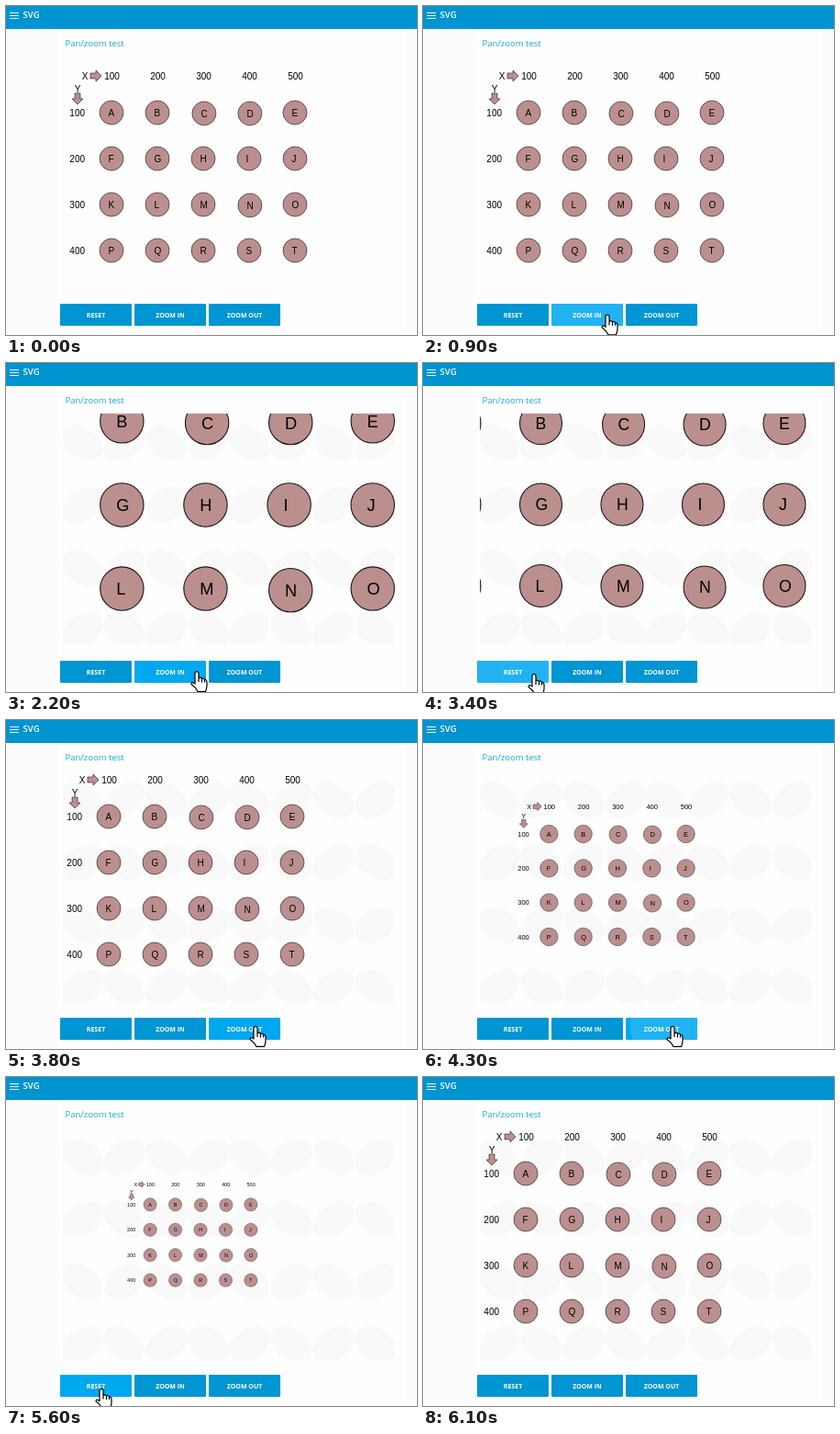
Write an HTML page that moves like this. It is 448 px wide and 358 px high and loops after 7 s.

```html
<!DOCTYPE html>
<html lang="en">
<head>
<meta charset="utf-8">
<title>Pan/zoom test</title>
<style>
  html, body { margin: 0; width: 100%; height: 100%; overflow: hidden; background: #fcfcfc; }
  svg { display: block; }
  text { font-family: "Open Sans", sans-serif; }
  #plot text { font: 10px "Liberation Sans", Arial, sans-serif; }
  .mid { text-anchor: middle; }
  .shape { fill: #bc8f8f; stroke: #1c1414; stroke-width: .6; }
  .caption { font-size: 7px; font-weight: 700; fill: #fff; }
  .cursor { fill: #fff; stroke: #000; stroke-width: 1.2; stroke-linejoin: round; }
</style>
</head>
<body>
<svg width="448" height="358" viewBox="0 0 448 358">
  <defs id="defs">
    <clipPath id="view"><rect x="62" y="55" width="362" height="252"/></clipPath>
  </defs>
  <rect x="57" y="25" width="378" height="333" fill="#fefefe"/>
  <rect width="448" height="25" fill="#0094d1"/>
  <path d="M4 7.5h10M4 10.5h10M4 13.5h10" stroke="#fff" stroke-width=".9"/>
  <text x="18.6" y="13" font-size="9.5" font-weight="600" fill="#fff">SVG</text>
  <text x="64.5" y="44" font-size="9.5" fill="#1ba3dd">Pan/zoom test</text>
  <g clip-path="url(#view)">
    <g id="backdrop" fill="#f9f9f9"></g>
    <g id="plot"></g>
  </g>
  <g id="buttons"></g>
  <path id="hand" class="cursor" d="M-2 2Q0-1 2 2V8Q4 6.5 5.5 8.5Q7.5 7.5 8.5 9.5Q10.5 9 11 12V16Q11 19 9.5 22.5H1Q-1 18-6 14.5Q-6 11-2 14ZM2 8v4M5.5 8.5v4M8.5 9.5v3"/>
  <path id="move" class="cursor" d="M0-11L4-6H1.5V-1.5H6V-4L11 0L6 4V1.5H1.5V6H4L0 11L-4 6H-1.5V1.5H-6V4L-11 0L-6-4V-1.5H-1.5V-6H-4Z"/>
</svg>
<script>
const LOOP = 7000, STEP = 100;
const CENTER = { x: 212, y: 180 }, PAN = { x: 3, y: 11 };
const ZOOM = 1.35, ZOOM_MS = 230, RIPPLE_MS = 500;
const POINTER_IN = 100, POINTER_OUT = 6100;

const $ = id => document.getElementById(id);

function set(node, attrs) {
  for (const key in attrs) node.setAttribute(key, attrs[key]);
  return node;
}

function add(parent, tag, attrs, text = "") {
  const node = set(document.createElementNS("http://www.w3.org/2000/svg", tag), attrs);
  node.textContent = text;
  return parent.appendChild(node);
}

// Faint ornament of tilted leaves, mirrored left to right
for (let row = 0; row < 4; row++)
  for (let col = 0; col < 4; col++)
    for (const side of [1, -1])
      add($("backdrop"), "ellipse", {
        rx: 25, ry: 17,
        transform: `translate(${243 + side * (22 + 46 * col)} ${87 + 68 * row})
          rotate(${side * ((row + col) % 2 ? -35 : 35)})`
      });

const plot = $("plot");
const at = i => 50 * i;
const label = (x, y, text) => add(plot, "text", { x, y: y + 3.6, class: "mid" }, text);
for (let col = 0; col < 5; col++) label(112.5 + at(col), 65, 100 * (col + 1));
for (let row = 0; row < 4; row++) {
  label(74.7, 105 + at(row), 100 * (row + 1));
  for (let col = 0; col < 5; col++) {
    const letter = String.fromCharCode(65 + row * 5 + col);
    const nudge = "CDN".includes(letter) ? .9 : 0;
    const x = 112 + at(col) + nudge, y = 105 + at(row) + nudge;
    add(plot, "circle", { cx: x, cy: y, r: 13, class: "shape" });
    add(plot, "text", { x: x - 3.4, y: y + 3.6 }, letter);
  }
}
label(83, 65, "X");
label(75, 79, "Y");
for (const place of ["translate(89 65)", "translate(75 84) rotate(90)"])
  add(plot, "path", { class: "shape", transform: place, d: "M0-3H6V-6L12 0L6 6V3H0Z" });

const buttons = ["RESET", "ZOOM IN", "ZOOM OUT"].map((name, i) => {
  const x = 59 + 81 * i, box = { x, y: 324, width: 78, height: 24, rx: 1 };
  add(add($("defs"), "clipPath", { id: "edge" + i }), "rect", box);
  const face = add($("buttons"), "rect", box);
  const ripple = add($("buttons"), "circle", { fill: "#fff", "clip-path": `url(#edge${i})` });
  add($("buttons"), "text", { x: x + 39, y: 339, class: "mid caption" }, name);
  return { name, x, face, ripple };
});

// Pointer rests: x, arrival, departure
const rests = [
  [201, 600, 1700], [208, 2100, 2300], [262, 2500, 2700],
  [121, 3100, 3500], [272, 3800, 4900], [104, 5400, POINTER_OUT]
];
// Button, press time, start of the zoom
const clicks = [
  ["ZOOM IN", 600, 930], ["ZOOM IN", 1500, 1630], ["RESET", 3110, 3342],
  ["ZOOM OUT", 4100, 4110], ["ZOOM OUT", 4780, 4810], ["RESET", 5590, 5650]
];
const rescale = { "RESET": () => 1, "ZOOM IN": s => s * ZOOM, "ZOOM OUT": s => s / ZOOM };

const clamp = v => Math.min(1, Math.max(0, v));
const mix = (a, b, k) => a + (b - a) * k;
const ease = k => k < .5 ? 4 * k ** 3 : 1 - 4 * (1 - k) ** 3;

function pointerAt(t) {
  let x = 308, y = 193, left = POINTER_IN;
  for (const [restX, arrive, leave] of rests) {
    const k = clamp((t - left) / (arrive - left));
    x = mix(x, restX, k);
    y = mix(y, 342 - restX / 30, k);
    left = leave;
  }
  return { x, y };
}

function viewAt(t) {
  let scale = 1, pan = 1;
  for (const [name, , start] of clicks) {
    const k = ease(clamp((t - start) / ZOOM_MS));
    scale = mix(scale, rescale[name](scale), k);
    if (name === "RESET") pan = mix(pan, 0, k);
  }
  return { scale, pan };
}

function drawButton({ name, x, face, ripple }, t, pointer) {
  const hover = pointer && pointer.y > 324 && pointer.x >= x && pointer.x < x + 78;
  set(face, { fill: hover ? "#00a8ef" : "#0095d3" });
  const press = clicks.find(c => c[0] === name && t >= c[1] && t < c[1] + RIPPLE_MS);
  const age = press ? t - press[1] : 0;
  const from = pointerAt(t - age);
  set(ripple, { cx: from.x, cy: from.y, r: .23 * age, opacity: .13 * clamp((RIPPLE_MS - age) / 150) });
}

function draw(t) {
  const { scale, pan } = viewAt(t);
  set(plot, {
    transform: `translate(${CENTER.x} ${CENTER.y}) scale(${scale})
      translate(${PAN.x * pan - CENTER.x} ${PAN.y * pan - CENTER.y})`
  });
  $("backdrop").style.display = t > clicks[0][2] ? "" : "none";

  const pointer = t >= POINTER_IN && t < POINTER_OUT ? pointerAt(t) : null;
  const active = pointer && (pointer.y < 307 ? "move" : "hand");
  for (const id of ["hand", "move"]) $(id).style.display = id === active ? "" : "none";
  if (active) set($(active), { transform: `translate(${pointer.x} ${pointer.y})` });
  for (const button of buttons) drawButton(button, t, pointer);
}

const begin = performance.now();
function tick() {
  const t = (performance.now() - begin) % LOOP;
  draw(Math.floor(t / STEP) * STEP);
  requestAnimationFrame(tick);
}
tick();
</script>
</body>
</html>
```
